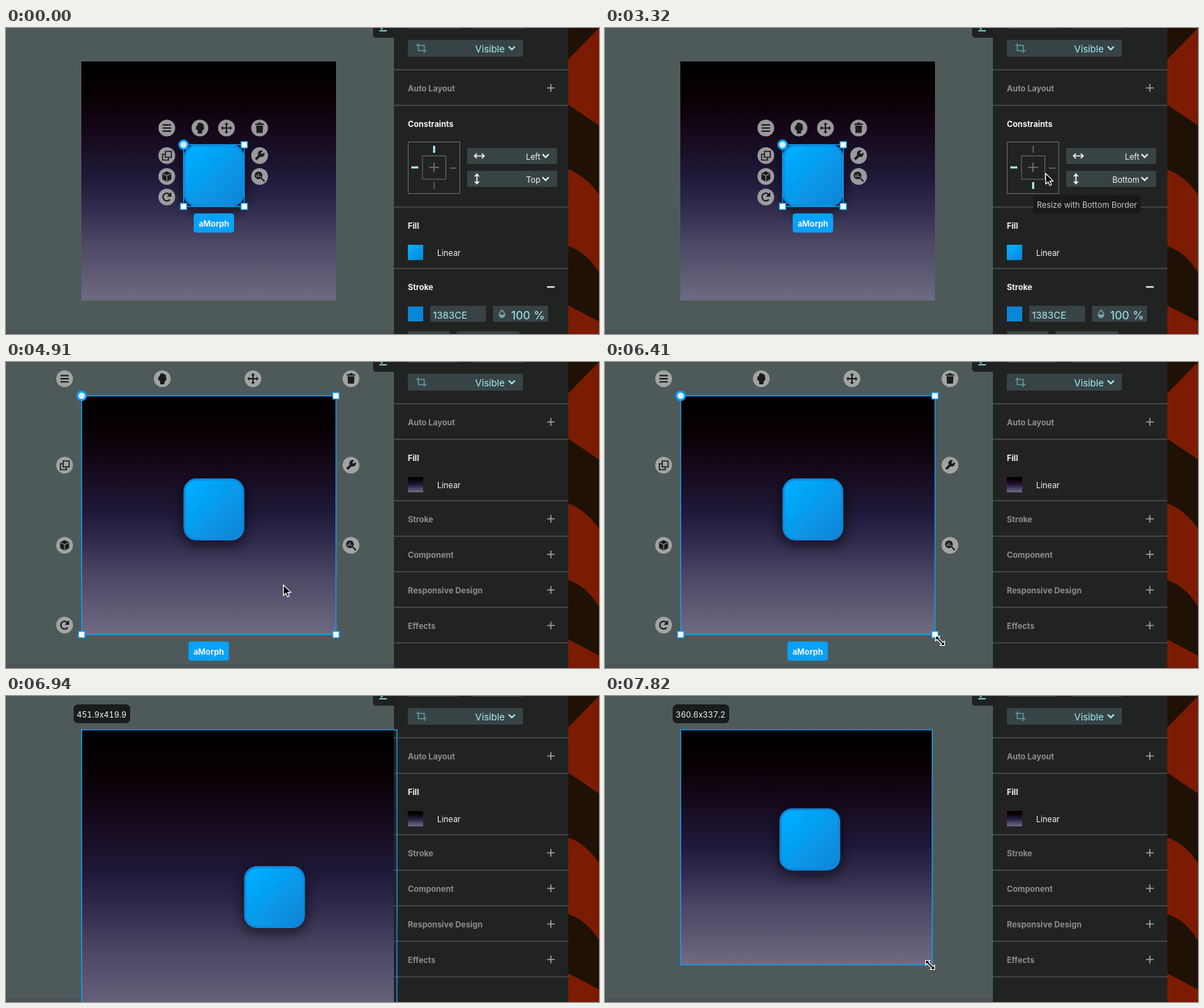
These frames come from a looping animation (850x439 px, 8000 ms). An HTML page:

```html
<!DOCTYPE html>
<html lang="en">
<head>
<meta charset="utf-8">
<title>Constraints demo</title>
<style>
html, body { margin: 0; width: 100%; height: 100%; overflow: hidden; background: #4e5a5a; }
svg { display: block; width: 850px; height: 439px; }
text { font: 11.5px Inter, sans-serif; fill: #f4f4f4; }
.bold { font-weight: 700; }
.dim { fill: #8b8d8d; }
.cyan { fill: #a2eef1; }
.end { text-anchor: end; }
.mid { text-anchor: middle; }
.line { fill: none; stroke: #1b1b1b; stroke-width: 2; }
.blue { fill: none; stroke: #0fa2fc; stroke-width: 1.3; }
.arrow { fill: #000; stroke: #fff; stroke-width: 1.2; stroke-linejoin: round; }
#size { font-size: 11.4px; font-variant-numeric: tabular-nums; }
</style>
</head>
<body>
<svg viewBox="0 0 850 439">
  <defs>
    <linearGradient id="night" x2="0" y2="1">
      <stop stop-color="#000"/>
      <stop offset=".15" stop-color="#080003"/>
      <stop offset=".28" stop-color="#140717"/>
      <stop offset=".5" stop-color="#201a3b"/>
      <stop offset=".62" stop-color="#322c4e"/>
      <stop offset=".75" stop-color="#4a4663"/>
      <stop offset="1" stop-color="#6e6b83"/>
    </linearGradient>
    <linearGradient id="sky" x2="1" y2="1">
      <stop offset=".1" stop-color="#04adff"/>
      <stop offset="1" stop-color="#0a84d4"/>
    </linearGradient>
    <filter id="shadow" x="-50%" y="-50%" width="200%" height="200%">
      <feDropShadow dx="0" dy="5" stdDeviation="10" flood-color="#0a0410" flood-opacity=".75"/>
    </filter>
  </defs>
  <path fill="#4a5156" d="M0 434h556v5H0z"/>
  <rect id="frame" x="108" y="48" fill="url(#night)"/>
  <g id="square"><rect x="1.5" y="1.5" width="84" height="86" rx="17" fill="url(#sky)" stroke="#0b88da" stroke-width="3" filter="url(#shadow)"/></g>
  <path fill="#1d2122" d="M526 0h30v14h-25q-5 0-5-5z"/>
  <path class="blue" style="stroke:#a2eef1" d="M535 4h11M537 0l3 2"/>
  <path fill="#212322" d="M556 0h250v439H556z"/>
  <path fill="#1f1106" d="M806 0h44v439h-44z"/>
  <path fill="#7b1c02" d="M806 45 850 0v140l-44-30zM806 203q24 8 44 36v112q-18-30-44-38zM806 398l44 23v18h-44z"/>
  <g id="panel"></g>
  <g id="childProps"></g>
  <g id="parentProps"></g>
  <g id="childTools"></g>
  <g id="parentTools"></g>
  <g id="drag">
    <rect id="outline" class="blue" x="108.5" y="48.5"/>
    <rect x="97" y="12" width="81" height="27" rx="6" fill="#181c1d"/>
    <text id="size" class="mid" x="137" y="30.5"></text>
  </g>
  <g id="tip">
    <rect height="26" rx="4" fill="#181919"/>
    <text x="5" y="18" style="fill:#c3c4c4"></text>
  </g>
  <path id="pointer" class="arrow" d="M.6.6V16L4.2 12.7 6.5 18 9 17 6.8 11.6H11.4Z"/>
  <path id="resizer" class="arrow" d="M-6.5-6.5H0L-2.2-4.3 4.3 2.2 6.5 0V6.5H0L2.2 4.3-4.3-2.2-6.5 0Z"/>
</svg>
<script>
const $ = id => document.getElementById(id);
const label = (x, y, s, cls = '', size = 11.5) =>
  `<text x="${x}" y="${y}" class="${cls}" style="font-size:${size}px">${s}</text>`;
const box = (x, y, w, h, fill = '#384346', rx = 1) =>
  `<rect x="${x}" y="${y}" width="${w}" height="${h}" rx="${rx}" fill="${fill}"/>`;
const stroke = (d, color, width = 1.6, id = '') =>
  `<path id="${id}" d="${d}" fill="none" stroke="${color}" stroke-width="${width}"/>`;
const plus = (x, y, r = 5.5, color = '#a0a2a2') =>
  stroke(`M${x - r} ${y}h${2 * r}M${x} ${y - r}v${2 * r}`, color);
const chevron = (x, y, color = '#e8f4f4') => stroke(`M${x - 4.5} ${y - 2.5}l4.5 4.5 4.5-4.5`, color, 2);
const rules = ys => ys.map(y => box(556, y - 1, 250, 1.8, '#444746', 0)).join('');
const closedRow = (name, y) => label(576, y + 5, name, 'bold dim') + plus(781, y);

$('panel').innerHTML =
  box(576, 0, 73, 1) + box(669, 0, 72, 1) + box(576, 17, 165, 24) +
  stroke('M591 22v10.5h12M588 25h11.5v11', '#5e999d', 1.5) +
  label(715, 34.5, 'Visible', 'cyan end', 13.5) + chevron(725, 29, '#a2eef1') +
  rules([60, 111]) + closedRow('Auto Layout', 86);

const field = (y, id, icon) => box(661, y, 129, 23) + stroke(icon, '#f4f4f4', 1.6) +
  `<text id="${id}" class="end" x="766" y="${y + 16.5}"></text>` + chevron(773.5, y + 11.5);

$('childProps').innerHTML =
  label(576, 142, 'Constraints', 'bold') +
  stroke('M576.5 163.5h74v74h-74zM597 183.5h33.5v33.5H597z', '#6a6e6e', 1) +
  plus(613.5, 200, 7, '#757979') +
  stroke('M613.7 169v10', '', 3, 'barTop') + stroke('M613.7 221v10', '', 3, 'barBottom') +
  stroke('M581 200h10', '', 3, 'barLeft') + stroke('M636 201h10', '', 3, 'barRight') +
  field(172, 'horizontal', 'M672 183.5h13M675 180l-3.5 3.5 3.5 3.5M682 180l3.5 3.5-3.5 3.5') +
  field(205, 'vertical', 'M675 210v13M672 213l3-3.5 3 3.5M672 220l3 3.5 3-3.5') +
  rules([257, 345]) +
  label(576, 288, 'Fill', 'bold') + box(576, 311, 22, 22, 'url(#sky)', 0) + label(618, 327, 'Linear') +
  label(576, 376, 'Stroke', 'bold') + stroke('M775.5 371.5h11', '#fff', 2) +
  box(576, 399.5, 22, 21.5, '#0a86d7', 0) +
  box(608, 398.5, 80, 23) + label(612, 417, '1383CE', 'cyan', 13.7) +
  box(698, 398.5, 79, 23) +
  stroke('M711 404.5q-4 4.5-4 7a4 4 0 0 0 8 0q0-2.500-4-7z', '#74a9ad', 1.4) +
  '<path fill="#74a9ad" d="M707 411h8a4 4 0 0 1-8 0z"/>' +
  label(724, 417.500, '100 %', 'cyan', 16.500) +
  box(576, 435, 60, 4) + box(646, 435, 90, 4);

$('parentProps').innerHTML =
  label(576, 142, 'Fill', 'bold') + box(576, 165, 22, 22, 'url(#night)', 0) + label(618, 181, 'Linear') +
  rules([199, 250, 301, 352, 403]) +
  ['Stroke', 'Component', 'Responsive Design', 'Effects'].map((s, i) => closedRow(s, 225 + 51 * i)).join('');

const line = d => `<path class="line" d="${d}"/>`;
const solid = d => `<path fill="#1b1b1b" d="${d}"/>`;
const icons = {
  menu: line('M-6-4.500H6M-6 0H6M-6 4.500H6'),
  hand: solid('M-5.500-2.500 -3-5V-7L0-8 5-5.500 6 1 3 5V8H-3V4L-6 1Z'),
  move: line('M-6 0H6M0-6V6') + solid('M-8 0l3-3v6zM8 0l-3-3v6zM0-8l-3 3h6zM0 8l-3-3h6z'),
  trash: solid('M-6-6.500h3.500l1-1.500h3l1 1.500H6v2H-6zM-5-3.500H5L4.300 7H-4.300z'),
  copy: line('M-2-6H6.500V2.500H-2zM-2-2H-6V6.500H2.500V2.500').replace('class', 'style="stroke-width:1.6" class'),
  cube: solid('M0-7.500 6.500-4.500V4L0 7.500-6.500 4V-4.500Z') + stroke('M-6-4 0-1 6-4M0-1V7', '#989898', 1.1),
  rotate: line('M4.300 3.500A5.500 5.500 0 1 1 4.300-3.500') + solid('M6.500-7V-.5H0z'),
  wrench: stroke('M-5.500 5.500 2-2', '#1b1b1b', 3.6) +
    solid('M6.500-4.500 3.500-2 1.800-3.800 4.500-7A4.800 4.800 0 1 0 7-4Z'),
  search: line('M2.500 2.500 7 7') + solid('M-1.500-7a5.500 5.500 0 1 0 .01 0z') +
    stroke('M-4 1V-2M-1.500 1V-4M1 1V-1', '#989898', 1.3)
};
const icon = (name, x, y) =>
  `<g transform="translate(${x} ${y})"><circle r="12" fill="#b0b0b0" opacity=".86"/>${icons[name]}</g>`;
const knob = (x, y) => `<rect class="blue" style="fill:#fff" x="${x - 4.500}" y="${y - 4.500}" width="9" height="9"/>`;

// Selection box with its handles, name tag and round tool buttons
function tools(left, top, right, bottom, tagX, tagY, xs, ys) {
  const [x0, x1, x2, x3] = xs, [y0, y1, y2, y3] = ys;
  return `<path class="blue" d="M${left} ${top}H${right}V${bottom}H${left}Z"/>` +
    `<circle cx="${left}" cy="${top}" r="6" fill="#d5f2ff" stroke="#0fa2fc" stroke-width="3"/>` +
    knob(right, top) + knob(left, bottom) + knob(right, bottom) +
    box(tagX - 29, tagY, 58, 27.500, '#08a1fc', 4) + label(tagX, tagY + 18.500, 'aMorph', 'bold mid') +
    icon('menu', x0, y0) + icon('hand', x1, y0) + icon('move', x2, y0) + icon('trash', x3, y0) +
    icon('copy', x0, y1) + icon('cube', x0, y2) + icon('rotate', x0, y3) +
    icon('wrench', x3, y1) + icon('search', x3, y2);
}
$('childTools').innerHTML = tools(254.5, 167.5, 341.5, 256, 298, 266,
  [230.5, 278, 316, 363.5], [143.5, 183, 213, 242.5]);
$('parentTools').innerHTML = tools(108.5, 48.5, 473, 391, 290.5, 401,
  [84, 224, 354, 494.5], [24, 148, 263, 377.5]);

// Mouse path: time, x, y
const path = [
  [410, 431, 406], [700, 500, 352], [1000, 590, 268], [1190, 614, 246], [1250, 615, 241],
  [1610, 614, 225], [2140, 614, 225], [2310, 605, 225], [2970, 605, 225], [3320, 631, 208],
  [3610, 637, 204], [4020, 637, 204], [4370, 397, 319], [5090, 397, 319], [5630, 478, 395],
  [5750, 478, 395], [5930, 470, 392], [6350, 470, 392], [6410, 480, 400], [6650, 522, 437],
  [6940, 557.3, 468.7], [7110, 557.5, 470], [7170, 557.5, 470], [7500, 498, 415], [7820, 466, 386]
];
function mouse(t) {
  const i = path.findIndex(p => p[0] > t);
  if (i < 1) return (i ? path[path.length - 1] : path[0]).slice(1);
  const [a, b] = [path[i - 1], path[i]], u = (t - a[0]) / (b[0] - a[0]);
  return [1, 2].map(k => a[k] + (b[k] - a[k]) * u);
}

const show = (id, on) => $(id).style.display = on ? '' : 'none';
const set = (el, attrs) => { for (const k in attrs) el.setAttribute(k, attrs[k]); };
const bar = (id, on) => set($(id), { stroke: on ? '#a2eef1' : '#6a6e6e', 'stroke-width': on ? 3 : 1.5 });

function render(t) {
  const [x, y] = mouse(t), dragging = t >= 6470, parent = t >= 4910;
  const width = dragging ? x + 2.6 - 108 : 365, height = dragging ? y - .8 - 48 : 343;
  set($('frame'), { width, height });
  set($('outline'), { width, height });
  set($('square'), { transform: `translate(${width - 110.5} ${height - 176})` });
  $('size').textContent = width.toFixed(1) + 'x' + height.toFixed(1);

  show('childProps', !parent);
  show('childTools', !parent);
  show('parentProps', parent);
  show('parentTools', parent && !dragging);
  show('drag', dragging);

  const bottom = t >= 2670, right = t >= 3780;
  bar('barTop', !bottom);
  bar('barBottom', bottom);
  bar('barLeft', !right);
  bar('barRight', right);
  $('vertical').textContent = bottom ? 'Bottom' : 'Top';
  $('horizontal').textContent = right ? 'Right' : 'Left';

  const overRight = t >= 3610, tip = $('tip');
  show('tip', t >= 3030 && t < 3500 || overRight && !right);
  set(tip, { transform: overRight ? 'translate(641 213)' : 'translate(614 240)' });
  set(tip.firstElementChild, { width: overRight ? 142 : 154 });
  tip.lastElementChild.textContent = `Resize with ${overRight ? 'Right' : 'Bottom'} Border`;

  const resizing = t >= 5810;
  show('pointer', t >= 410 && !resizing);
  show('resizer', resizing);
  set($(resizing ? 'resizer' : 'pointer'), { transform: `translate(${x} ${y})` });
}

const start = performance.now();
function tick() {
  render((performance.now() - start) % 8000);
  requestAnimationFrame(tick);
}
tick();
</script>
</body>
</html>
```
